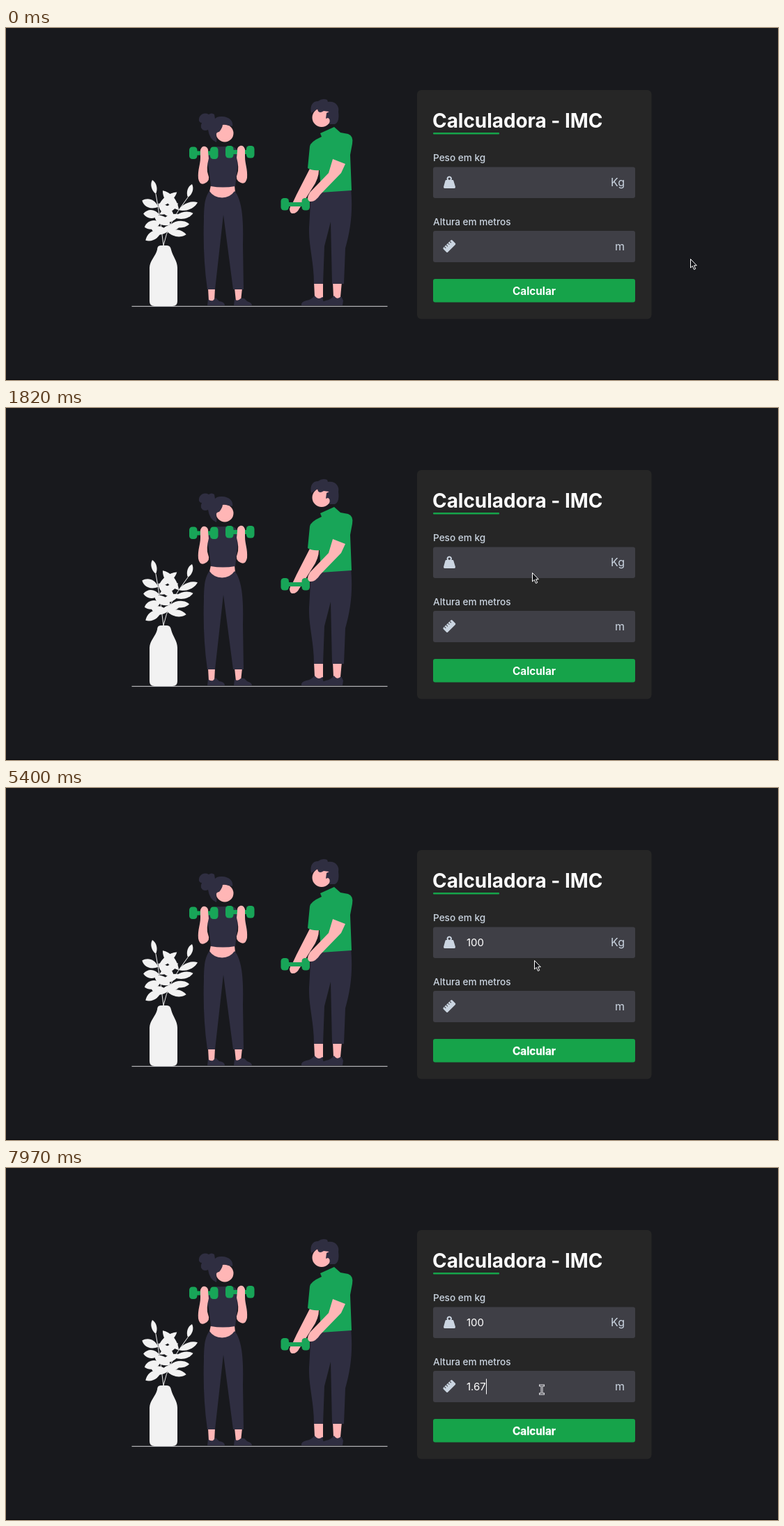
An HTML page for the animation above (8000 ms loop, 1108x505 px).

```html
<!DOCTYPE html>
<html lang="pt-BR">
<head>
<meta charset="utf-8">
<title>Calculadora - IMC</title>
<style>
  html, body { margin: 0; width: 100%; height: 100%; overflow: hidden; background: #18191d; }
  svg { display: block; width: 1108px; height: 505px; font-family: Inter, sans-serif; }
  .skin { fill: #ffb6b6; }
  .dark { fill: #2f2e41; }
  .green { fill: #18a558; }
  .pale { fill: #f2f2f2; }
  .field { fill: #3f3f46; }
  .label { fill: #cbd5e1; font-size: 13.6px; font-weight: 500; }
  .unit { fill: #cbd5e1; font-size: 16px; text-anchor: end; }
  .value { fill: #fff; font-size: 15px; }
  .icon { fill: #cbd5e1; }
</style>
</head>
<body>
<svg viewBox="0 0 1108 505">
  <defs>
    <g id="dumbbell" class="green">
      <rect x="5" y="6" width="32" height="6"/>
      <rect width="11.5" height="17.5" rx="4.5"/>
      <rect x="30" width="11.5" height="17.5" rx="4.5"/>
    </g>
  </defs>

  <!-- plant -->
  <path class="pale" d="M217 318Q217 312 222 312H231Q236 312 237 318C239 327 246 334 246 344V392Q246 399 239 399H213Q206 399 206 392V344C206 334 215 327 217 318Z"/>
  <g id="plant" class="pale"></g>
  <path d="M180.500 399.300H547.500" stroke="#d4d4d8"/>

  <!-- woman -->
  <path class="skin" d="M290 373H300L299 392H291ZM328 373H339L337 392H330Z"/>
  <path class="dark" d="M290 389Q293 392 297 391L301 387 306 392Q314 393 314 398H289ZM328 389Q332 393 337 388L342 388 346 392Q353 394 353 398H327Z"/>
  <path class="skin" d="M294 226H328L329 236Q326 245 311 244 296 244 292 235Z"/>
  <path class="dark" d="M303 170Q312 171 321 169C333 171 335 178 333 192L329 227Q311 230 294 227L291 202C286 182 291 174 303 170Z"/>
  <path class="dark" d="M292 234Q298 243 310 243.500 322 243 328 234C339 246 341 276 340 310L341 375H326L312 268 300 375H289C284 340 283 306 284 274 284 253 286 242 292 234Z"/>
  <circle class="skin" cx="314" cy="151" r="12.500"/>
  <path class="dark" d="M302 164C304 158 298 150 306 149Q311 143 311 138L325 141C327 133 319 126 308 127Q303 127 300 130L299 124Q295 121 291 124C284 120 276 125 277 133Q278 136 281 136C277 145 284 149 290 146Q292 160 302 164Z"/>
  <use href="#dumbbell" x="263" y="170.500"/>
  <use href="#dumbbell" x="315" y="169"/>
  <path id="arm" class="skin" d="M279 175Q281 169 286 170 291 172 290 178L291 187Q287 202 290 210 294 219 285 223 278 226 276 216C275 203 279 196 279 186Z"/>
  <use href="#arm" transform="matrix(-1 0 0 1 622 -1)"/>

  <!-- man -->
  <path class="skin" d="M442 364H455V386L447 391 443 386ZM469 364H482L480 386 474 391 470 386Z"/>
  <path class="dark" d="M443 384Q448 391 454 386L457 398H424Q423 393 431 391 438 390 443 384ZM471 384Q475 391 481 385L484 391 483 398H452Q451 393 459 391 466 390 471 384Z"/>
  <path class="dark" d="M438 233L495 230C498 262 495 288 487 316L485 367H468L466 278 457 313 455 367H442C442 335 434 312 435 286Z"/>
  <path class="skin" d="M437 200L449 204Q449 216 440 229L421 259Q417 267 410 266 405 262 409 256L417 239Z"/>
  <use href="#dumbbell" x="394.500" y="244"/>
  <path class="skin" d="M408 256L420 257Q418 267 410 265 406 262 408 256Z"/>
  <path class="green" d="M451 151L471 142 480 150 491 152Q499 155 497 166L494 182 496 233 452 236 450 204Q440 205 433 201L436 170Q437 163 453 156Z"/>
  <path class="skin" d="M469 188L487 195 481 208 451 239Q444 250 436 249 430 246 436 236L463 208Z"/>
  <circle class="skin" cx="453" cy="128.500" r="13.500"/>
  <path class="dark" d="M438 122C436 111 440 105 448 105Q454 100 461 103L462 106C473 104 479 113 477 120Q479 135 472 138L464 138Q466 130 462 129L459 130 460 122 464 120 456 119Q448 124 447 116 441 120 438 122Z"/>

  <!-- form -->
  <rect x="590" y="89" width="336.500" height="328.500" rx="6" fill="#262626"/>
  <text x="612" y="142.500" fill="#fff" font-size="27.900" font-weight="700">Calculadora - IMC</text>
  <rect x="613" y="150" width="95" height="2.500" rx="1" fill="#16a34a"/>
  <text class="label" x="613" y="191">Peso em kg</text>
  <rect class="field" x="613" y="199.500" width="290" height="44.500" rx="3"/>
  <path class="icon" fill-rule="evenodd" d="M633 218A3.700 3.700 0 1 1 639.500 218H641Q642 218 642.300 219L645 228Q645 230 643.500 230H629.500Q628 230 628 228L630.500 219Q630.800 218 632 218ZM636.200 214.500A1.700 1.700 0 1 0 636.300 214.500Z"/>
  <text class="unit" x="888" y="227">Kg</text>
  <text class="label" x="613" y="283">Altura em metros</text>
  <rect class="field" x="613" y="291" width="290" height="45" rx="3"/>
  <g transform="translate(636.300 313) rotate(-45)">
    <rect class="icon" x="-9" y="-4.500" width="18" height="9" rx="1.500"/>
    <path d="M-6 -3H6" stroke="#3f3f46" stroke-width="3" stroke-dasharray="1 2.600"/>
  </g>
  <text class="unit" x="888" y="319">m</text>
  <rect x="613" y="360" width="290" height="33.500" rx="3" fill="#16a34a"/>
  <text id="button" x="758" y="382.500" text-anchor="middle" fill="#fff" stroke="#fff" font-size="15.300" font-weight="700">Calcular</text>
  <text id="weight" class="value" x="661" y="227"></text>
  <text id="height" class="value" x="661" y="319"></text>
  <rect id="caret" width="1" height="22" fill="#fff"/>
  <rect y="504" width="1108" height="1" fill="#08080a"/>

  <g id="pointer">
    <circle id="click" r="10" fill="#99942a"/>
    <path id="arrow" d="M.5 .5V13L3.300 10.400 5.500 15.500 7.700 14.500 5.500 9.700H9.300Z" fill="#111216" stroke="#fff"/>
    <g id="beam" fill="none">
      <path d="M-4 -6H4M-4 6H4M0 -6V6" stroke="#e4e4e7" stroke-width="3"/>
      <path d="M-3 -6H3M-3 6H3M0 -6V6" stroke="#3f3f46"/>
    </g>
  </g>
</svg>
<script>
  const LOOP = 8000, BLINK = 530, CLICK = 140;
  const $ = id => document.getElementById(id);
  const show = (id, on) => $(id).setAttribute('visibility', on ? 'visible' : 'hidden');
  const bezier = (a, b, c, k) => a.map((v, i) => v * (1 - k) ** 2 + 2 * b[i] * k * (1 - k) + c[i] * k * k);

  function leaf([x, y], dx, dy, width) {
    const len = Math.hypot(dx, dy), nx = -dy / len * width, ny = dx / len * width;
    const side = s => [x + dx * .3 + nx * s, y + dy * .3 + ny * s, x + dx * .75 + nx * s, y + dy * .75 + ny * s];
    const [a, b, c, d] = side(1), [e, f, g, h] = side(-1);
    return `<path d="M${x} ${y}C${a} ${b} ${c} ${d} ${x + dx} ${y + dy}C${g} ${h} ${e} ${f} ${x} ${y}"/>`;
  }

  // A bent stem with a bud on top and leaf pairs that turn upwards along it
  function spray(bend, top, bud, left, right) {
    const root = [226, 312];
    let out = `<path d="M${root}Q${bend} ${top}" fill="none" stroke="#f2f2f2"/>` + leaf(top, ...bud, 5);
    for (let i = 0; i < 4; i++) {
      const joint = bezier(root, bend, top, .3 + i * .15);
      out += leaf(joint, -23, left - i * 8, 8) + leaf(joint, 27, right - i * 5, 6.5);
    }
    return out;
  }
  $('plant').innerHTML = spray([222, 275], [215, 238], [-5, -20], 15, -6)
    + spray([232, 280], [261, 243], [6, -19], -4, 4);

  // Pointer moves: start, end, bend, destination
  const start = [982, 331];
  const moves = [
    [550, 1330, [975, 210], [761, 201]],
    [1360, 1700, [758, 218], [755, 236]],
    [1950, 2180, [755, 232], [756, 228]],
    [5200, 5700, [760, 275], [770, 316]],
    [7960, 7970, [770, 317], [769, 318]]
  ];
  const fields = [
    { id: 'weight', text: '100', focus: 2540, keys: [4360, 4560, 4680], caretY: 210 },
    { id: 'height', text: '1.67', focus: 5760, keys: [6370, 6620, 7350, 7470], caretY: 302.500 }
  ];

  function position(t) {
    let at = start;
    for (const [from, to, bend, end] of moves) {
      if (t < from) break;
      at = bezier(at, bend, end, Math.min(1, (t - from) / (to - from)) ** 1.75);
    }
    return at.map(Math.round);
  }

  function drawField({ id, text, focus, keys, caretY }, t) {
    const typed = keys.filter(k => k <= t);
    $(id).textContent = text.slice(0, typed.length);
    if (t < focus) return;
    const width = typed.length ? $(id).getComputedTextLength() : 0;
    $('caret').setAttribute('x', Math.round(661 + width));
    $('caret').setAttribute('y', caretY);
    const since = t - Math.max(focus, ...typed);
    show('caret', Math.floor(since / BLINK) % 2 === 0);
  }

  function draw() {
    const t = performance.now() % LOOP;
    show('caret', false);
    for (const field of fields) drawField(field, t);

    const [x, y] = position(t), hovering = t >= 1980;
    const beam = hovering && (y < 244 || y > 290);
    $('pointer').setAttribute('transform', `translate(${x} ${y})`);
    show('beam', beam);
    show('arrow', !beam);
    show('click', [2460, 5720].some(c => t >= c && t < c + CLICK));
    $('button').setAttribute('stroke-width', hovering ? .3 : 0);
    requestAnimationFrame(draw);
  }
  draw();
</script>
</body>
</html>
```
